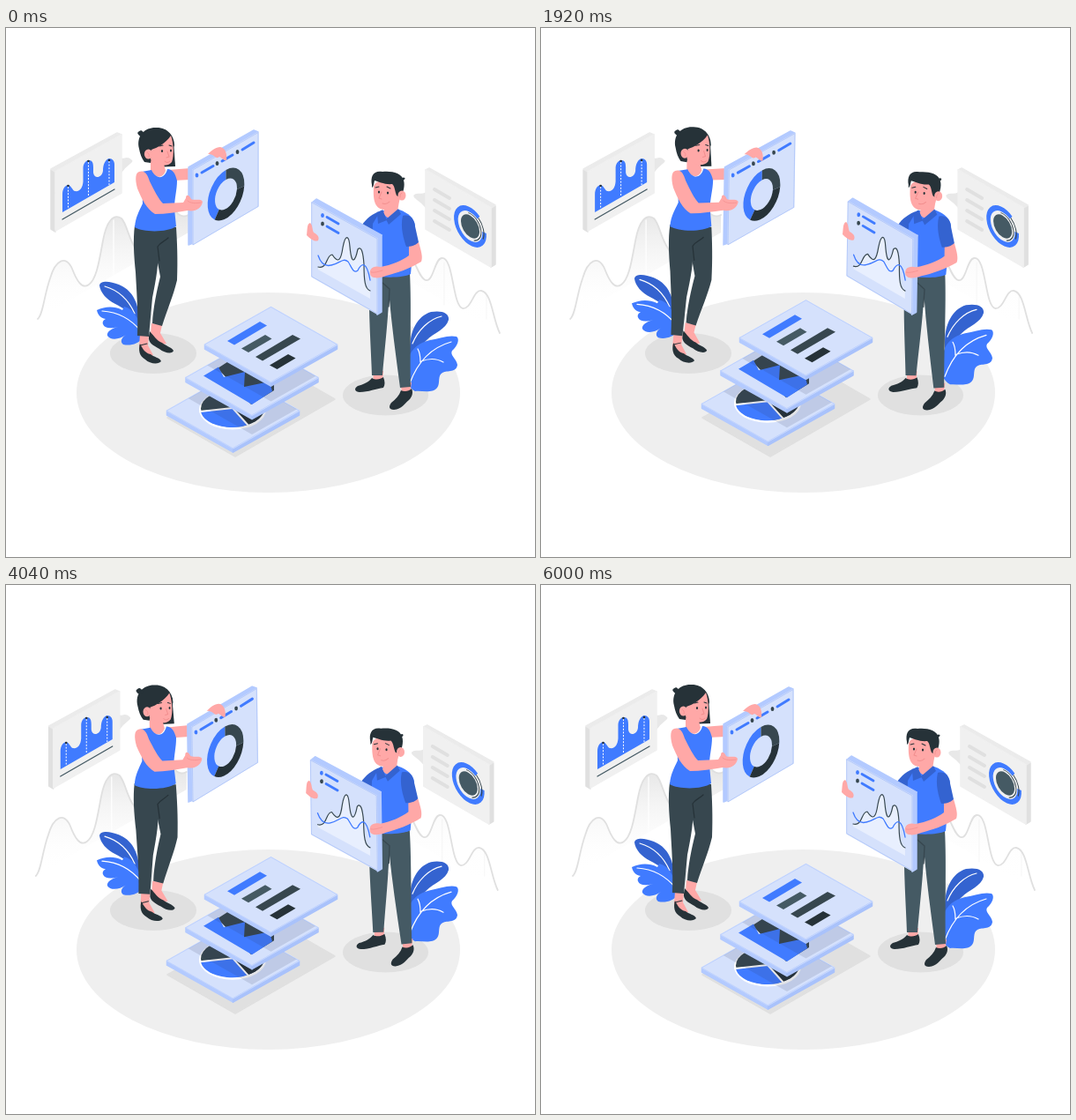
Write an HTML page with a canvas that moves like this. It is 600 px wide and 600 px high and loops after 6.04 s.

```html
<!DOCTYPE html>
<html lang="en">
<head>
<meta charset="utf-8">
<title>Data panels</title>
<style>
html, body { margin: 0; width: 100%; height: 100%; overflow: hidden; background: #fff; }
canvas { display: block; width: 600px; height: 600px; }
</style>
</head>
<body>
<canvas id="stage" width="600" height="600"></canvas>
<script>
const ctx = document.getElementById('stage').getContext('2d');
const LOOP = 6040, CYCLE = 6000;
const BLUE = '#407bff', DEEP = '#3463d0', INK = '#263238', SLATE = '#37474f', STEEL = '#455a64';
const SKIN = '#ffa8a7', BLUSH = '#f28f8f', FACE = '#d5e1fc', EDGE = '#b3caff', RIM = '#9fbaf8';
const PALE = '#f0f0f0', GREY = '#e0e0e0';

const cache = {};
const path = d => cache[d] || (cache[d] = new Path2D(d));
function fill(d, color) {
  ctx.fillStyle = color;
  ctx.fill(path(d));
}
function line(d, color, width, cap = 'round') {
  ctx.strokeStyle = color;
  ctx.lineWidth = width;
  ctx.lineCap = cap;
  ctx.lineJoin = 'round';
  ctx.stroke(path(d));
}
function block(d, color) {
  fill(d, color);
  line(d, color, 1.5);
}
function oval(x, y, rx, ry, color, turn = 0) {
  ctx.fillStyle = color;
  ctx.beginPath();
  ctx.ellipse(x, y, rx, ry, turn, 0, Math.PI * 2);
  ctx.fill();
}
function group(draw, dx = 0, dy = 0) {
  ctx.save();
  ctx.translate(dx, dy);
  draw();
  ctx.restore();
}
function swing(draw, x, y, angle) {
  ctx.save();
  ctx.translate(x, y);
  ctx.rotate(angle);
  ctx.translate(-x, -y);
  draw();
  ctx.restore();
}
// Arc on a unit circle skewed onto an upright isometric plane
function arc(x, y, plane, r, width, from, to, color) {
  ctx.save();
  ctx.translate(x, y);
  ctx.transform(plane[0], plane[1], 0, plane[2], 0, 0);
  ctx.beginPath();
  ctx.arc(0, 0, r, from * Math.PI / 180, to * Math.PI / 180);
  ctx.strokeStyle = color;
  ctx.lineWidth = width;
  ctx.lineCap = 'butt';
  ctx.stroke();
  ctx.restore();
}

function floor() {
  oval(297.5, 413.5, 217.5, 113.5, '#efefef');
  oval(167, 369, 49, 23, GREY);
  oval(430.5, 416.5, 48.5, 23, GREY);
  block('M183 442L260 486L373 421L298 378Z', GREY);
}

function fade(y0, y1, color) {
  const g = ctx.createLinearGradient(0, y0, 0, y1);
  g.addColorStop(0, color);
  g.addColorStop(1, 'rgba(255,255,255,0)');
  return g;
}

const HILLS = 'M36 330C42 325 43 304 50 284C56 263 68 257 75 273C80 286 86 297 94 291C103 285 106 262 110 241' +
  'C114 219 122 210 131 216C137 222 139 239 147 250C158 272 168 268 175 240C181 214 187 206 193 209C197 213 202 215 207 212';
const DIPS = 'M456 258C464 260 468 284 476 286C485 288 486 262 494 261C508 259 506 315 518 318C528 319 530 297 539 298C551 300 552 330 560 346';

function leftBack() {
  fill(HILLS + 'L207 232L100 293Z', fade(214, 325, 'rgba(224,224,224,.75)'));
  line('M122 218V280', 'rgba(255,255,255,.8)', 1.5);
  line(HILLS, GREY, 1.8);
  block('M130 148C134 150 137 145 142 150C145 152 137 154 131 163Z', '#e8e8e8');
  block('M51 161L56 163V231L51 228Z', GREY);
  block('M51 160L126 119L131 121L56 163Z', '#ebebeb');
  block('M56 163L131 121V187L56 230Z', PALE);
  fill('M64 209V189C64 182 67 179 70 178C74 178 75 184 78 185C84 186 87 181 87.5 174V158C88 153 91 150 94 150' +
    'C98 150 99 153 99 158V164C100 172 109 170 110 162C110 154 113 149 117 148C121 148 123 151 123 155V175Z', BLUE);
  ctx.setLineDash([2, 1.6]);
  line('M70.5 180V205M93.5 152V191M117 151V178', '#fff', 1, 'butt');
  ctx.setLineDash([]);
  [[70.5, 179], [93.5, 151], [117, 150]].forEach(p => oval(...p, 1.3, 1.3, INK));
  line('M64 217L123 183', STEEL, 1.3);
}

function rightBack() {
  fill(DIPS + 'L456 286Z', fade(260, 340, 'rgba(240,240,240,.25)'));
  line('M497 266V314M545 304V330', 'rgba(224,224,224,.25)', 1);
  line(DIPS, GREY, 1.8);
  block('M476 187C470 191 467 186 463 190C462 193 470 195 476 203Z', '#e8e8e8');
  block('M550 204L555 202V268L550 271Z', GREY);
  block('M476 161L480 159L555 201L550 204Z', '#ebebeb');
  block('M476 161L550 204V271L476 228Z', PALE);
  for (let i = 0; i < 4; i++) group(() => line('M486 183L503 193', GREY, 4), 0, i * 12);
  const plane = [18.5, 10.4, 21.6];
  arc(526.5, 225, plane, .87, .25, -6, 306, BLUE);
  arc(526.5, 225, plane, .84, .06, -54, 20, SLATE);
  arc(526.5, 225, plane, .285, .57, 0, 360, STEEL);
  arc(526.5, 225, plane, .67, .05, -100, 70, SLATE);
}

function leftPlant() {
  fill('M106 292C107 286 118 287 128 291C142 297 150 308 152 334L145 330C142 322 133 318 124 313C114 308 107 300 106 292Z', DEEP);
  line('M112 293C126 297 138 306 146 324', '#fff', 1.2);
  fill('M103 320C112 316 122 315 132 320L134 316C146 319 153 332 154 352C151 358 141 361 133 359C129 356 131 351 136 348' +
    'C128 354 118 354 115 349C114 345 119 341 127 339C119 341 112 341 110 336C109 333 111 331 113 330C107 329 104 325 103 320Z', BLUE);
  line('M109 321C125 322 141 329 153 344', '#fff', 1.2);
}

function rightPlant() {
  fill('M458 364C458 344 466 327 482 322C494 320 503 323 502 331C499 342 486 345 476 355C470 361 464 369 458 375Z', DEEP);
  line('M494 327C480 330 467 343 461 358', '#fff', 1.2);
  fill('M457 374C460 363 469 357 481 354C492 352 502 348 511 350C515 353 512 361 506 366C503 371 511 375 512 382' +
    'C511 391 501 388 495 391C489 394 493 403 489 408C483 415 472 411 464 412C460 410 457 406 455 402Z', BLUE);
  line('M458 403C466 381 480 363 505 356M467 364C470 369 470 375 470 379M471 378C481 374 489 375 496 379', '#fff', 1.2);
}

const diamond = (x, y) => `M${x - 75} ${y}L${x} ${y - 42.5}L${x + 75} ${y}L${x} ${y + 42.5}Z`;
function slab(x, y, art, shade) {
  block(`M${x - 75} ${y}L${x} ${y + 42.5}V${y + 47}L${x - 75} ${y + 5}Z`, EDGE);
  block(`M${x + 75} ${y}L${x} ${y + 42.5}V${y + 47}L${x + 75} ${y + 5}Z`, '#a9c2fb');
  const top = diamond(x, y);
  block(top, FACE);
  line(top, EDGE, .7);
  ctx.save();
  ctx.clip(path(top));
  art();
  if (shade) fill(diamond(x + 21.5, y - 37.5 + shade), 'rgba(38,50,80,.13)');
  ctx.restore();
}

function slabs() {
  slab(257.5, 434, () => {
    oval(257, 433, 38, 22.5, '#fff');
    oval(257, 431.5, 36, 21, SLATE);
    fill('M257 431L221 435C223 446 240 453 257 453C264 453 269 452 274 450Z', BLUE);
    fill('M257 431L274 450C287 446 294 437 293 429C291 420 284 415 275 412Z', INK);
    line('M220 435L257 431L275 451M257 431L276 411', '#fff', 2);
  }, 22);
  slab(279, 396.5, () => {
    fill('M240 386L254 377L304 402V411L278 427Z', SLATE);
    fill('M224 394.5L241 384.5L247 396L271 390L270 407L299 401L302 412L279 427Z', BLUE);
  }, 22);
  slab(300.5, 359, () => {
    fill('M251 355L288 333L296 337.5L259 359.5Z', BLUE);
    fill('M267 363.5L294 348L301.5 352.5L275 368Z', STEEL);
    fill('M283 373L325 348L334 352.5L291 377.5Z', SLATE);
    fill('M299 382.5L320 370L328.5 374.5L307.5 387Z', INK);
  });
}

function womanPanel() {
  block('M207 159L212 161V244L207 246Z', EDGE);
  block('M207 158L281 116L286 118L212 161Z', EDGE);
  block('M212 161L286 118.5V202L212 245.5Z', FACE);
  line('M212 245.5V161L286 118.5V202Z', RIM, .6);
  line('M222 164L235 156.5M245 151L257 144M268 138L281 130', BLUE, 3);
  oval(216.5, 167, 1.9, 2.5, BLUE);
  oval(239.5, 153.5, 1.9, 2.5, SLATE);
  oval(262.5, 140.5, 1.9, 2.5, SLATE);
  const ring = (from, to, color) => arc(249.5, 188.5, [20.8, -11.6, 27.6], .8, .4, from, to, color);
  ring(128, 270, BLUE);
  ring(270, 365, SLATE);
  ring(5, 128, INK);
}

function woman() {
  // Legs and shoes
  fill('M165 335L177 337L175 346L182 358L172 360L164 348Z', SKIN);
  fill('M163 344C167 348 171 355 177 357C180 360 188 362 190 366C189 370 180 369 174 364C167 360 161 357 162 350Z', INK);
  fill('M152 347L162 348L161 360L167 371L158 373L151 362Z', SKIN);
  fill('M152 358C155 364 158 369 164 370C167 373 175 374 176 378C173 382 163 381 158 376C151 372 150 365 152 358Z', INK);
  line('M152 360L160 358', INK, 1);
  fill('M160 226L193 226C194 242 195 262 194 286C190 303 183 319 177 338L166 335C167 317 171 298 175 282L168 245Z', SLATE);
  fill('M146 224L188 226C185 235 179 241 172 247C174 266 170 286 166 306L162 350L149 349C150 318 148 298 147 277C145 257 144 240 146 224Z', SLATE);
  line('M184 238C180 242 175 243 172 248L174 264', INK, 1.2);
  // Far arm, panel and hand
  fill('M184 161L209 159V172L190 173Z', SKIN);
  womanPanel();
  fill('M229 143C233 139 238 135 243 135C249 136 251 143 250 150C247 151 245 147 242 146C238 150 236 142 229 143Z', SKIN);
  // Body
  fill('M184 122L190 128L192 157L177 157.5Z', INK);
  fill('M164 146L178 150L181 162C178 171 169 171 164 162Z', SKIN);
  fill('M154 163L165 161C170 172 180 172 183 160C189 160 192 165 194 173C194 184 191 193 191 205L193 225C183 232 156 232 146 226' +
    'C147 214 151 208 155 199Z', BLUE);
  fill('M151 163C147 164 146 171 149 182C154 194 160 206 169 211C181 211 194 209 206 207C215 209 222 204 223 197C221 193 214 196 210 194' +
    'C208 189 204 188 204 193L201 198L178 199C173 194 168 184 163 174C160 164 156 161 151 163Z', SKIN);
  line('M206 196C209 199 215 199 221 198', BLUSH, .7);
  // Head
  fill('M151 137C147 121 159 112 171 113C184 113 191 123 191 133L188 140L166 140L164 153L157 152C154 148 152 143 151 137Z', INK);
  oval(153.5, 120, 3.5, 3, INK, .6);
  oval(152, 118.5, 3, 1.8, INK, -.5);
  fill('M165 138C171 136 181 131 187 122C190 130 191 145 188 152C183 158 172 157 164 149Z', SKIN);
  oval(161.5, 143, 4.6, 5.5, SKIN);
  line('M160 141C162 142 163 144 162 146', BLUSH, .8);
  oval(177, 139.5, 1.1, 1.5, INK);
  oval(187, 139, 1, 1.5, INK);
  line('M174 134L178 133M185 133L188 134', INK, 1);
  line('M183 140L185 146L182 147M180 151C182 153 184 153 186 151', BLUSH, 1);
}

function manPanel() {
  block('M421 239L426 235V322L421 325Z', EDGE);
  block('M347 198L352 194L426 235L421 239Z', EDGE);
  block('M347 198L421 239V324L347 282Z', FACE);
  line('M347 198L421 239V324L347 282Z', RIM, .6);
  oval(359, 212.5, 1.9, 2.5, BLUE);
  oval(359, 222, 1.9, 2.5, SLATE);
  line('M364 214.5L377 222M364 225L377 232.5', BLUE, 2.8);
  const wave = 'M354 271C365 274 363 257 370 257C377 268 380 263 382 249C385 233 389 235 390 248C392 270 396 265 399 251' +
    'C403 247 405 254 406 268C406 286 407 296 413 298';
  fill(wave + 'V307L354 274Z', 'rgba(255,255,255,.45)');
  line(wave, SLATE, 1.2);
  line('M354 258C357 267 362 271 369 269C379 267 382 260 388 265C392 271 394 279 399 275C403 267 409 263 413 286', BLUE, 1.3);
}

function man() {
  // Legs and shoes
  fill('M416 389H428L427 402L417 403Z', SKIN);
  fill('M415 397C420 400 425 398 428 396C430 401 430 405 428 408C420 409 411 413 401 413C396 413 394 409 399 406C406 404 411 402 415 397Z', INK);
  fill('M448 402H460L458 415L449 417Z', SKIN);
  fill('M448 411C452 413 457 412 460 409C462 413 461 418 457 422C452 426 449 432 440 433C434 433 434 429 437 425C442 421 446 417 448 411Z', INK);
  fill('M412 280H437L434 313C432 344 429 369 427 394H415C414 362 411 326 412 280Z', STEEL);
  fill('M419 279L458 278C460 314 458 367 459 407L447 408C442 370 437 334 434 298L423 292Z', STEEL);
  line('M427 289L435 296L434 316', SLATE, 1.3);
  // Torso
  fill('M426 207C416 210 408 217 404 223V235H421Z', DEEP);
  fill('M425 207L446 206C457 210 463 216 464 224L459 279C449 284 427 283 414 281L416 222Z', BLUE);
  fill('M431 199L446 196L444 209C440 216 432 218 428 210Z', SKIN);
  fill('M427 206L432 218L422 222L421 211Z', DEEP);
  fill('M445 205L448 211L434 223L431 217Z', DEEP);
  // Panel and arms
  manPanel();
  fill('M345 221C341 222 342 229 341 235C345 239 350 243 354 241C356 237 353 234 349 232C347 228 348 224 345 221Z', SKIN);
  fill('M457 246L468 243C471 253 473 260 471 265C458 273 443 278 431 281C424 284 414 285 413 279C412 273 416 269 425 271' +
    'C437 269 449 264 457 258Z', SKIN);
  line('M414 277C418 278 423 276 427 275', BLUSH, .7);
  fill('M450 213C458 211 463 216 464 225L468 243C464 247 459 248 454 248C451 239 447 226 450 213Z', DEEP);
  // Head
  fill('M417 180C419 171 433 171 447 178L447 193C445 203 438 207 429 206C419 205 416 197 417 180Z', SKIN);
  fill('M415 178C413 168 417 161 427 163C437 162 449 164 451 173C453 179 450 187 448 193L443 190C441 185 441 179 438 177C430 178 422 174 418 173C417 177 417 180 415 181Z', INK);
  oval(450, 171.5, 2.5, 1.5, INK, -.5);
  oval(449, 190, 4.5, 5.5, SKIN);
  line('M449 187C447 188 447 190 447 192', BLUSH, .8);
  oval(423, 186, 1.1, 1.5, INK);
  oval(433, 187, 1.1, 1.5, INK);
  line('M419 181L423 180M432 180L436 182', INK, 1);
  line('M426 186L423 193L426 194M427 199C430 200 433 199 435 197', BLUSH, 1);
}

// Linear keyframes: [fraction, value]
function keys(list, p) {
  for (let i = 1; i < list.length; i++) {
    const [a, u] = list[i - 1], [b, v] = list[i];
    if (p <= b) return u + (v - u) * (p - a) / (b - a);
  }
  return 0;
}
const SHAKE = [0, -1, 2, -4, 4, -4, 4, -4, 2, -1, 0].map((v, i) => [i / 10, v * 1.2]);
const WIND = [[0, 0], [.25, 1], [.75, -1], [1, 0]];

function draw(ms) {
  const t = ms % CYCLE, p = t / CYCLE;
  const lift = -12 * (1 - Math.abs(2 * p - 1));
  const shake = keys(SHAKE, p);
  const lean = keys(WIND, t % 1500 / 1500) * Math.PI / 180;
  ctx.fillStyle = '#fff';
  ctx.fillRect(0, 0, 600, 600);
  floor();
  group(leftBack, shake);
  group(rightBack, shake);
  group(leftPlant, 0, lift);
  group(rightPlant, 0, lift);
  swing(woman, 216, 247, lean);
  swing(man, 407, 298, lean);
  group(slabs, 0, lift);
}

const start = performance.now();
function tick() {
  draw((performance.now() - start) % LOOP);
  requestAnimationFrame(tick);
}
tick();
</script>
</body>
</html>
```
